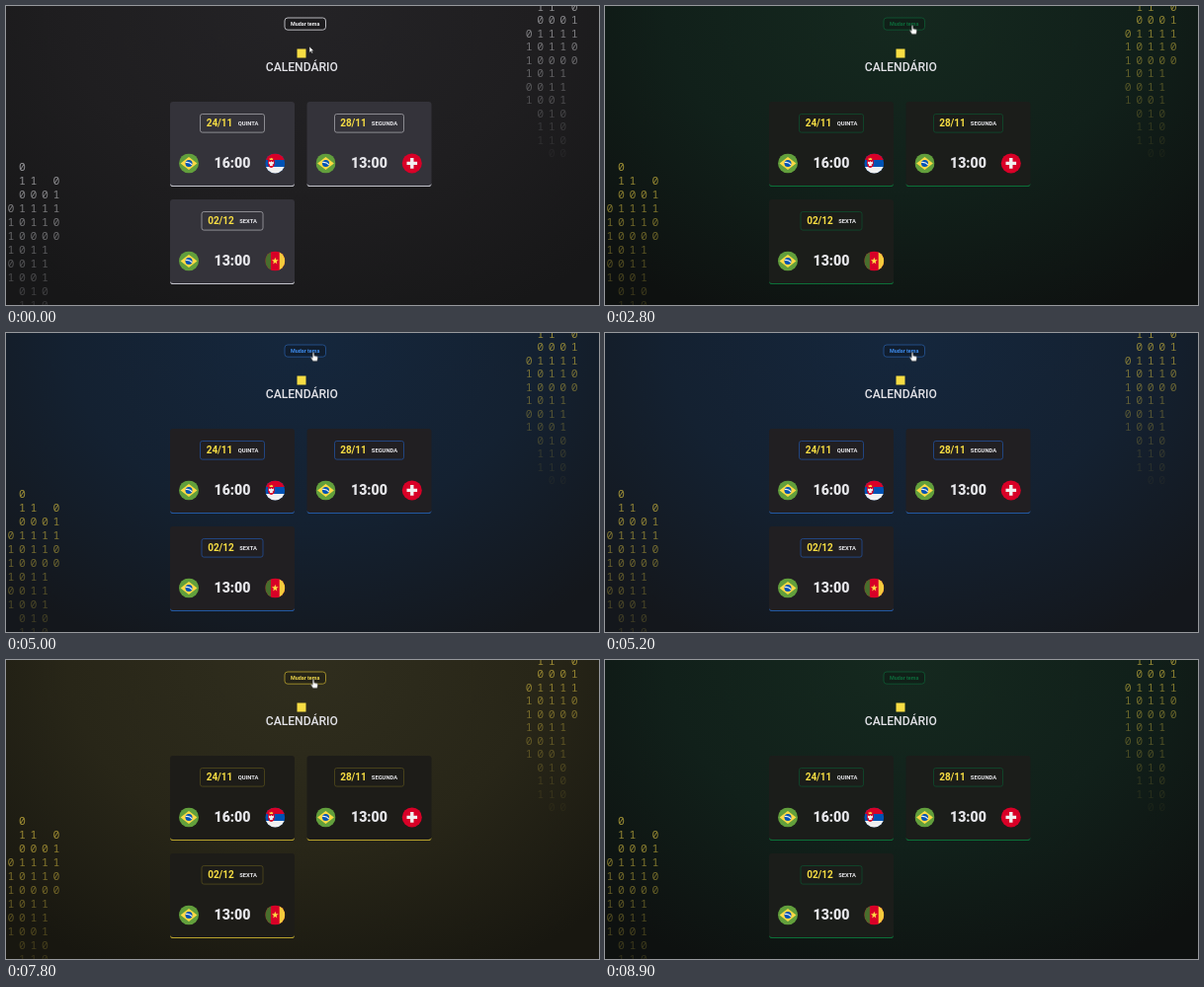
Recreate the animation shown at these times as an HTML page. Size 600 by 303 pixels, loop 9 s.

```html
<!DOCTYPE html>
<html lang="pt-BR">
<head>
<meta charset="utf-8">
<title>Calendário</title>
<style>
  html, body { margin: 0; width: 100%; height: 100%; overflow: hidden; background: #151516; }

  svg {
    display: block;
    width: 100%;
    height: 100%;
    background: radial-gradient(ellipse 72% 115% at 50% 0, var(--glow), var(--mid) 55%, var(--edge));
    font-family: Roboto, sans-serif;
    font-weight: 700;
    animation: theme 9s step-end infinite;
  }

  @keyframes theme {
    0%, 72.22% {
      --glow: #242326; --mid: #1f1e20; --edge: #171718; --card: #34333a;
      --line: #c4c4cc; --badge: #a2a2a8; --button: #c9c9ce; --label: #f0f0f2; --bits: #b4b4b8;
    }
    11.11%, 86.66% {
      --glow: #302e1e; --mid: #282618; --edge: #181710; --card: #1d1c18;
      --line: #b8a22c; --badge: #544c1c; --button: #a8932c; --label: #f0d84c; --bits: #c6ae3c;
    }
    31.11%, 92.22% {
      --glow: #15291f; --mid: #11201a; --edge: #0e1110; --card: #1b1d1a;
      --line: #0b7038; --badge: #0f4d2e; --button: #0f5532; --label: #0d6b3b; --bits: #c2ad3c;
    }
    55.55% {
      --glow: #15273d; --mid: #142131; --edge: #14171c; --card: #211f22;
      --line: #2259a4; --badge: #22509a; --button: #24528f; --label: #3d8cee; --bits: #c2ad3c;
    }
  }

  .card { fill: var(--card); }
  .line { fill: var(--line); }
  .badge { fill: none; stroke: var(--badge); stroke-width: .8; }
  .button { fill: #0003; stroke: var(--button); stroke-width: .9; }
  .label { fill: var(--label); font-size: 5.4px; }
  .title { fill: #e1e1e6; font-size: 12.1px; font-weight: 500; }
  .date { fill: #f7dd43; font-size: 10px; }
  .day { fill: #e8e8ec; font-size: 5.8px; }
  .hour { fill: #e6e6ea; font-size: 14.1px; font-weight: 800; }
  .bits { fill: var(--bits); font: 400 11.5px "Noto Sans Mono", monospace; }
  text { text-anchor: middle; }

  #cursor { animation: move 9s linear infinite; }
  #arrow { animation: arrow 9s step-end infinite; }
  #hand { animation: hand 9s step-end infinite; }

  @keyframes move {
    0% { transform: translate(307px, 41px); }
    1.11% { transform: translate(307px, 41px); animation-timing-function: steps(8, start); }
    10% { transform: translate(311px, 19.5px); }
    93.33% { transform: translate(311px, 19.5px); animation-timing-function: steps(6, start); }
    100% { transform: translate(313px, -16px); }
  }
  @keyframes arrow { 0%, 94.44% { opacity: 1; } 7.77% { opacity: 0; } }
  @keyframes hand { 0%, 94.44% { opacity: 0; } 7.77% { opacity: 1; } }
</style>
</head>
<body>
<svg viewBox="0 0 600 303" preserveAspectRatio="none">
  <defs>
    <clipPath id="disc"><circle r="10"/></clipPath>
    <g id="brazil" clip-path="url(#disc)">
      <path d="M-10-10h20v20h-20z" fill="#629f3c"/>
      <path d="M0-6.5 8.4 0 0 6.5-8.4 0z" fill="#ffda44"/>
      <circle r="3.5" fill="#0052b4"/>
      <path d="M-3.3-.9Q.8-1.5 3.2 1.5" fill="none" stroke="#f0f0f0" stroke-width="1.1"/>
    </g>
    <g id="serbia" clip-path="url(#disc)">
      <path d="M-10-10h20v20h-20z" fill="#0052b4"/>
      <path d="M-10-10h20v6.5h-20z" fill="#d80027"/>
      <path d="M-10 3.5h20v7h-20z" fill="#f0f0f0"/>
      <path d="M-7.2-3.5h6.6v4q0 3-3.3 4.2Q-7.2 3.5-7.2.5z" fill="#d80027"/>
      <path d="M-6.4-1.8l1.7.6.8-1.1.8 1.1 1.7-.6v2.4l-1.3.6.4 1.5h-3.2l.4-1.5-1.3-.6z" fill="#f0f0f0"/>
      <path d="M-5.6-5.4l1 .8.7-1 .7 1 1-.8v1.9h-3.4z" fill="#ffda44"/>
    </g>
    <g id="switzerland">
      <circle r="10" fill="#d80027"/>
      <path d="M-1.7-5.3h3.4v3.6h3.6v3.4H1.7v3.6h-3.4V1.7h-3.6v-3.4h3.6z" fill="#f0f0f0"/>
    </g>
    <g id="cameroon" clip-path="url(#disc)">
      <path d="M-10-10h20v20h-20z" fill="#d80027"/>
      <path d="M-10-10h5.6v20H-10z" fill="#496e2d"/>
      <path d="M4.4-10H10v20H4.4z" fill="#f5cb3c"/>
      <path d="M0-3.6.9-1.1 3.4-1.1 1.4.5 2.1 3 0 1.5-2.1 3-1.4.5-3.4-1.1-.9-1.1z" fill="#ffda44"/>
    </g>
  </defs>

  <g id="scene"></g>

  <rect class="button" x="282" y="12" width="41.5" height="12.2" rx="3"/>
  <text class="label" x="302.7" y="20">Mudar tema</text>
  <rect x="294.5" y="43.5" width="9" height="9" fill="#f7dd43"/>
  <text class="title" x="299.3" y="66.2">CALENDÁRIO</text>

  <g id="cursor" stroke="#222" stroke-width=".5" fill="#fff">
    <path id="arrow" d="M0 0v6.2l1.5-1.3 1 2.2 1-.4-1-2.2h2z"/>
    <path id="hand" d="M-.8.5q.8-1 1.6 0v3l3.2.8q.8.3.6 1.3L4 9h-4.4L-2.7 5.6q0-1 .9-.7l1 .8z"/>
  </g>
</svg>
<script>
  const BITS = [" 0", " 11 0", " 0001", "01111", "10110", "10000", "1011",
    "0011", "1001", " 010", " 110", " 110", "  00"];
  const GAMES = [
    { x: 166, y: 97, date: "24/11", day: "QUINTA", hour: "16:00", rival: "serbia", badge: 65, dateX: 50, dayX: 79 },
    { x: 304.5, y: 97, date: "28/11", day: "SEGUNDA", hour: "13:00", rival: "switzerland", badge: 70, dateX: 47, dayX: 78.5 },
    { x: 166, y: 196, date: "02/12", day: "SEXTA", hour: "13:00", rival: "cameroon", badge: 62, dateX: 51.5, dayX: 79 }
  ];

  const text = (cls, x, y, value) => `<text class="${cls}" x="${x}" y="${y}">${value}</text>`;

  const card = g => `<g transform="translate(${g.x} ${g.y})">
    <rect class="card" width="126" height="86" rx="3"/>
    <path class="line" d="M0 83q.6 2 3 2h120q2.4 0 3-2 0 3.1-3 3.1H3Q0 86.1 0 83z"/>
    <rect class="badge" x="${63 - g.badge / 2}" y="12.5" width="${g.badge}" height="18.6" rx="2.2"/>
    ${text("date", g.dateX, 25.4, g.date)}
    ${text("day", g.dayX, 24, g.day)}
    ${text("hour", 63, 67.4, g.hour)}
    <use href="#brazil" x="19" y="62.4"/>
    <use href="#${g.rival}" x="106.3" y="62.4"/>
  </g>`;

  // Columns of binary digits that fade out downwards.
  const bits = (x, y, pitch) => BITS.map((row, r) =>
    `<g opacity="${(0.8 * (1 - r / 13)).toFixed(2)}">` +
    [...row].map((bit, c) => bit === " " ? "" : text("bits", x + c * 11.5, y + r * pitch, bit)).join("") +
    "</g>").join("");

  document.getElementById("scene").innerHTML =
    bits(5, 167.3, 14) + bits(529.3, -8.9, 13.5) + GAMES.map(card).join("");
</script>
</body>
</html>
```
